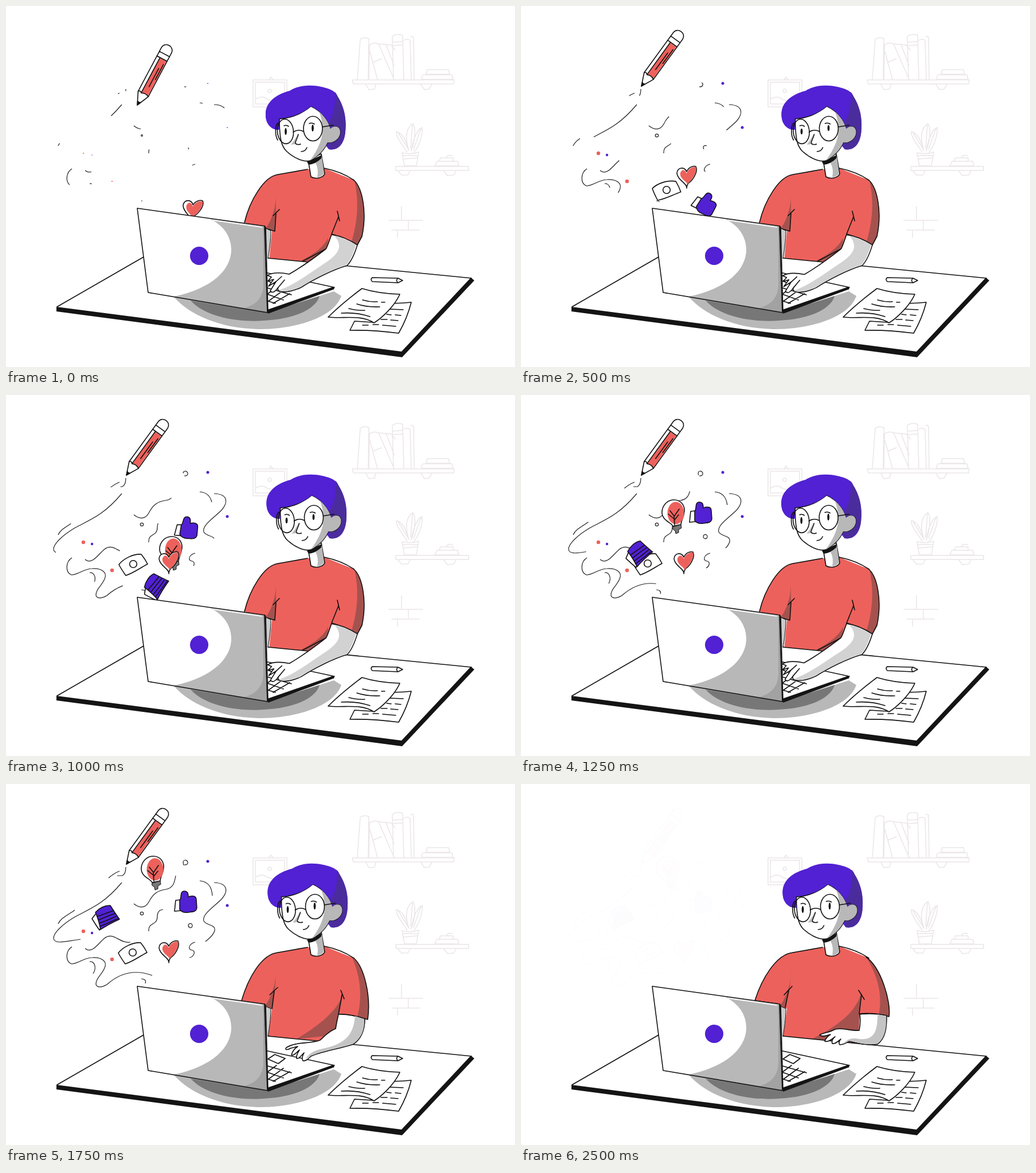
Recreate the animation shown at these times as an HTML page. Size 888x630 px, loop 2.75 s.

```html
<!DOCTYPE html>
<html lang="en">
<head>
<meta charset="utf-8">
<title>Ideas at the desk</title>
<style>
html, body { margin: 0; width: 100%; height: 100%; overflow: hidden; background: #fff; }
svg { display: block; width: 888px; height: 630px; }
path, ellipse, circle { stroke-linecap: round; stroke-linejoin: round; }
.ink { fill: none; stroke: #111; stroke-width: 1.6; }
.thin { fill: none; stroke: #222; stroke-width: 1.2; }
.thin path { stroke-linecap: butt; }
.wall { fill: none; stroke: #ebe6e8; stroke-width: 1.5; }
.paper { fill: #fff; stroke: #111; stroke-width: 1.6; }
.red { fill: #ed615c; }
.maroon { fill: #a5524e; }
.violet { fill: #5121d3; }
.plum { fill: #4a2c9c; }
.grey { fill: #b8b8b8; }
.dark { fill: #777; }
.black { fill: #141414; }
</style>
</head>
<body>
<svg viewBox="0 0 888 630">
  <g class="wall">
    <path d="M604,129H782L781,136H606ZM628,137L633,146L643,145L645,137M724,137L730,146L738,145L743,137"/>
    <path d="M613,128L618,58Q625,53 633,57L632,128M633,128L634,68Q642,62 650,66L677,128M650,66L672,68L679,77M640,98L655,92M648,128L635,80M663,67L677,104M676,128L674,53Q682,47 692,51L694,128M675,63L692,62M676,69L692,68M694,60Q700,56 705,60L707,128M706,54Q709,51 711,55L712,128"/>
    <path d="M735,111H772L774,119H733ZM728,120H778L780,128H726Q723,124 728,120"/>
    <path d="M431,129H490V176H431ZM435,133H486V171H435ZM459,129L462,124L466,129M435,163Q447,155 456,163Q470,168 485,162"/>
    <circle cx="460" cy="148" r="3"/>
    <path d="M680,280H807V287H680ZM684,288L690,295L701,295L705,288M764,288L770,296L781,295L785,288"/>
    <path d="M691,256Q705,260 720,255L716,279H695ZM692,261H719M694,267L717,265M700,255C690,240 680,228 681,219C692,222 697,233 703,252C694,225 700,212 710,205C716,216 714,232 707,253C710,232 718,215 726,212C727,228 720,245 712,255M709,208L706,248M684,221L702,250M724,214L711,250"/>
    <path d="M752,271H788L790,279H748ZM758,265H780V271H756ZM768,265Q770,259 779,261"/>
    <path d="M690,350V373M668,374H727M702,374V391M673,391H721M683,392V404"/>
  </g>

  <g id="ideas">
    <g id="lines" class="thin"></g>
    <g id="dots"></g>
    <g id="pencil">
      <path class="paper" d="M0,0L-10,-22V-92H10V-22Z"/>
      <path class="red" d="M-4,-22V-91H9V-22Q3,-26 -4,-22"/>
      <path class="ink" d="M-10,-22Q-7,-26 -4,-22Q3,-26 10,-22M-4,-22V-91M3,-38V-74M7,-54V-84"/>
      <path class="paper" d="M-10,-92H10V-101H-10ZM-10,-101V-109C-9,-121 9,-121 10,-109V-101Z"/>
      <path class="black" d="M0,0L-3.2,-7Q0,-5 3.2,-7Z" stroke="#111"/>
    </g>
    <g id="bulb">
      <path class="paper" d="M-1,23C-3,17 -20,13 -20,-1C-20,-13 -11,-23 1,-23C13,-23 20,-13 19,-3C18,9 13,13 13,20Z"/>
      <ellipse class="red" cx="4" cy="0" rx="14.5" ry="19.5"/>
      <path class="dark" stroke="#111" d="M-1,24L13,20L14,26L9,29V34L4,36L3,31L-1,28Z"/>
      <path class="ink" d="M2,21L1,5L-6,-4M1,6L10,-7M1,13L9,3M1,10L-9,2"/>
    </g>
    <g id="camera">
      <path class="paper" d="M-25,1C-18,-9 0,-18 14,-17C18,-12 22,-6 25,0C10,8 0,16 -13,20C-18,13 -22,7 -25,1Z"/>
      <circle class="ink" r="6.3"/>
    </g>
    <g id="card">
      <path class="paper" d="M-24,1L-17,-8L-3,8L-11,21Q-18,11 -24,1Z"/>
      <path class="violet" stroke="#111" stroke-width="1.5" d="M-18,-10C-12,-17 -1,-23 8,-22C13,-14 18,-6 24,2C13,7 0,14 -9,20Q-12,4 -18,-10Z"/>
      <path class="ink" d="M-14,-3Q0,-8 13,-13M-12,3Q2,-3 16,-8M-11,9Q3,4 18,-3M-9,14Q6,8 21,1"/>
    </g>
    <g id="thumb">
      <path class="paper" d="M-18,-3L-9,-4V15L-20,16Z"/>
      <path class="violet" stroke="#111" stroke-width="1.5" d="M-11,-3C-7,-8 -11,-18 -4,-19C4,-20 4,-13 4,-9C10,-11 18,-12 18,-4L19,10C18,18 10,17 4,18C-3,19 -8,17 -11,13Z"/>
    </g>
    <g id="heart">
      <path class="paper" d="M-1,20C1,12 -17,6 -18,-6C-17,-17 -5,-18 -1,-9C2,-16 10,-20 15,-18C20,-8 8,8 2,11C0,14 -1,16 -1,20Z"/>
      <path class="red" d="M0,13C0,8 -14,4 -12,-7C-9,-14 -4,-13 -1,-6C2,-14 9,-18 15,-17C18,-7 7,7 0,13Z"/>
    </g>
  </g>

  <g class="body">
    <path class="red" d="M475,294L526,285L555,283L607,304C622,318 630,360 621,402L613,417C600,411 585,402 568,398L590,455L459,445L464,392L416,378C425,340 450,297 475,294Z"/>
    <path class="maroon" d="M608,305C623,322 630,360 621,402L613,417L603,411C612,380 617,345 608,305ZM471,330C471,360 458,382 452,390L469,393L471,362ZM562,405C552,424 530,437 514,445L540,446L561,424Z"/>
    <path class="ink" d="M607,304C622,318 630,360 621,402L613,417C600,411 585,402 568,398L580,368M578,358L582,375M416,378C425,340 450,297 475,294M477,355L466,366M471,362L469,393L452,388M516,446L560,423"/>
  </g>
  <g class="body">
    <path class="red" d="M475,294L526,285L555,283L607,304C625,320 637,370 631,411L580,402L577,455L457,445L464,392L411,378C422,340 445,297 475,294Z"/>
    <path class="maroon" d="M604,303C627,322 637,370 631,411L613,406C621,375 620,340 604,303ZM472,325C470,360 456,382 450,390L465,393L469,362ZM589,364C578,400 535,428 507,445L575,438L580,402Z"/>
    <path class="ink" d="M607,304C625,320 637,370 631,411Q605,402 580,402L586,368M584,360L590,375M411,378C422,340 445,297 475,294M474,355L460,368M468,361L464,392"/>
  </g>
  <g class="body">
    <path class="red" d="M475,294L526,285L555,283L602,302C628,320 646,380 642,406L590,401L588,460L457,445L464,392L408,378C420,340 445,297 475,294Z"/>
    <path class="maroon" d="M602,302C628,320 646,380 642,406L624,403C632,365 620,330 602,302ZM472,325C470,360 456,382 450,390L461,390L468,362ZM593,366C582,405 540,428 508,445L588,450L591,401Z"/>
    <path class="ink" d="M602,302C628,320 646,380 642,406Q615,398 590,401L594,367M589,360L599,376M408,378C420,340 445,297 475,294M473,353L459,368M467,360L461,390M408,378L450,384"/>
  </g>
  <path fill="#ccc" stroke="#111" d="M453,388L462,392C462,410 459,428 457,442H452Z"/>
  <path class="ink" d="M475,294L526,285M555,283Q585,289 607,304"/>

  <path class="paper" d="M527,268L532,298C540,303 553,300 556,293L550,258Z"/>
  <path class="grey" d="M540,274L551,262L555,292Q551,298 543,299Q546,285 540,274Z"/>
  <path class="black" d="M525,272L551,260L550,266Q540,276 528,277Z"/>

  <g id="head">
    <path class="violet" d="M453,190C452,170 468,155 495,148C510,138 532,137 550,141C570,145 577,152 578,157C592,178 594,200 592,220C590,240 580,253 563,250L540,220L478,216C462,217 453,205 453,190Z"/>
    <path class="plum" d="M574,150C592,178 594,200 592,220C590,240 580,253 563,250L562,238L580,225L574,208L566,212Q580,180 574,150Z"/>
    <path class="paper" d="M477,197C477,230 480,245 490,254C502,265 519,273 530,270C545,262 556,250 561,238C572,240 583,231 583,220C583,209 571,208 566,214C563,200 550,183 532,175C515,189 495,196 477,197Z"/>
    <path class="grey" d="M546,184Q560,196 566,214C572,208 583,209 583,220C583,231 572,240 561,238C553,255 542,263 530,270Q549,245 552,222Q553,200 546,184ZM509,223L504,241L497,242Q504,234 509,223Z"/>
    <path class="violet" d="M453,190C453,170 470,154 500,147L548,150L532,175C515,189 495,196 472,195L478,216C462,217 453,205 453,190ZM532,175C550,183 563,200 566,214L575,206L570,160L540,150Z"/>
    <path class="plum" d="M574,150Q580,165 577,206L566,214L562,204Q576,185 574,150Z"/>
    <g class="ink">
      <ellipse cx="487.5" cy="219" rx="14" ry="21.5" transform="rotate(-5 487 219)"/>
      <ellipse cx="535.5" cy="214" rx="16.5" ry="21.5"/>
      <path d="M501,220Q510,214 519,219M552,211L571,208M475,204C469,207 469,226 474,234M485,209Q489,207 493,210M529,205Q534,203 538,206M510,224C508,232 504,237 505,240Q509,243 514,241M515,254Q522,254 525,247"/>
    </g>
    <ellipse class="eye" cx="488" cy="219" rx="1.8"/>
    <ellipse class="eye" cx="535" cy="213" rx="1.8"/>
  </g>

  <path fill="#fff" d="M89,526L240,438L457,440L812,475L690,606Z"/>
  <path class="ink" d="M89,525L240,438M457,440L812,475"/>
  <path class="black" d="M88,525L690,603L811,474L817,479L691,613L88,533Z"/>
  <path class="grey" d="M293,508L456,535L572,498L585,506C572,545 500,565 440,564C370,562 320,538 293,508Z"/>
  <path class="dark" d="M322,514C350,545 410,552 450,549C510,546 542,526 547,506L456,535Z"/>

  <path class="paper" d="M662,518Q685,520 707,517Q700,545 685,571Q640,565 600,566L608,550L640,552Z"/>
  <path class="ink" d="M668,529L693,530M664,538L672,539M679,539L689,540M654,547L665,547M671,548L684,549M640,556L650,556M657,557L680,559M622,557L632,557"/>
  <path class="paper" d="M621,493Q650,502 687,503C678,524 655,545 642,553C620,538 590,546 562,543C580,525 605,505 621,493Z"/>
  <path class="ink" d="M622,513Q635,517 648,516M655,517L661,517M612,520Q630,526 652,525M598,528Q615,532 626,531M585,536Q610,534 635,542"/>
  <path class="paper" d="M639,474L684,475L692,479L684,483L639,481Q635,477 639,474ZM684,475Q679,479 684,483"/>

  <path class="paper" d="M452,465L573,491L456,533Z"/>
  <path class="black" d="M456,530L571,490L573,494L457,537Z"/>
  <path class="ink" d="M457,480L469,472L487,479L475,488ZM456,492L498,504M456,503L484,513M457,515L470,519M484,496L458,515M472,491L457,502M495,502L466,519"/>

  <g class="arm" id="typing">
    <path stroke="#a5524e" fill="none" stroke-width="3" d="M594,446V453"/>
    <path class="paper" d="M568,399C563,412 561,420 558,424C540,438 515,456 494,468C480,465 465,465 456,470L463,473L457,480L467,477L458,489L471,481L461,497C465,503 471,497 475,491C470,501 492,502 515,491C535,478 570,460 595,453C603,445 609,430 613,417Q590,402 568,399Z"/>
    <path fill="#d2d2d2" d="M573,401Q590,404 611,417C606,430 602,443 594,452C570,459 535,477 515,490C496,499 478,499 476,496C500,488 525,470 550,453C577,436 591,422 573,401Z"/>
    <path class="ink" d="M481,472L471,481M486,478L475,491"/>
  </g>
  <g class="arm">
    <path class="paper" d="M580,402Q577,415 575,427C562,432 555,441 548,447C530,454 507,449 489,460C486,464 490,465 497,461L509,458Q500,464 498,473C502,475 506,469 512,464Q506,473 507,479C512,480 515,473 520,469Q515,478 518,483C523,484 527,480 532,475C555,465 588,461 606,454C620,445 626,428 626,410Q600,401 580,402Z"/>
    <path fill="#c4c4c4" d="M609,405L625,410C626,428 620,444 606,453C588,460 555,464 532,474L522,481Q530,466 552,462C590,454 606,440 609,405Z"/>
  </g>
  <g class="arm">
    <path class="paper" d="M591,402Q593,415 590,430C575,431 562,425 548,428C538,434 527,434 521,438C524,442 533,439 540,437Q532,442 530,449C536,451 542,445 548,441Q541,447 543,453C549,454 553,449 558,445Q553,451 556,455C564,455 568,451 573,449C590,453 605,457 622,454C636,444 638,425 638,404Q615,399 591,402Z"/>
    <path fill="#c4c4c4" d="M622,402L637,405C638,425 635,444 622,453C605,456 590,452 573,448L562,453Q572,441 590,445C617,448 622,430 622,402Z"/>
  </g>

  <path fill="#fff" d="M229,353L451,384L456,535L248,500Z"/>
  <path class="grey" d="M357,372L451,385L456,535L293,507C360,493 393,460 393,425Q392,390 357,372Z"/>
  <path fill="#a2a2a2" d="M449,386L452,385L456,535L415,527Q446,520 449,490Z"/>
  <path class="ink" d="M229,353L451,384L456,535L248,500Z"/>
  <path stroke="#fff" stroke-width="1.5" d="M362,374L446,386"/>
  <path class="ink" d="M451,384L453,386L457,533"/>
  <circle class="violet" cx="337" cy="436" r="16"/>
</svg>
<script>
const STEP = 250, STEPS = 11;
const $ = id => document.getElementById(id);
const all = sel => [...document.querySelectorAll(sel)];
const at = (list, n) => list[Math.min(n, list.length - 1)];

function add(parent, tag, attrs) {
  const el = document.createElementNS('http://www.w3.org/2000/svg', tag);
  for (const k in attrs) el.setAttribute(k, attrs[k]);
  return parent.appendChild(el);
}

const swirls = [
  'M202,172C170,210 148,217 120,232C98,245 83,260 83,269C84,281 106,274 130,271',
  'M91,244C96,233 108,229 120,220',
  'M115,284C104,291 103,309 114,314C126,314 136,303 150,303C168,302 177,310 172,321C167,333 156,340 157,350C160,357 169,354 176,350C196,332 222,322 255,334',
  'M138,287C150,297 160,279 172,269C188,257 198,279 217,276',
  'M146,310C154,309 159,320 152,331',
  'M198,152Q188,156 179,164',
  'M209,145Q209,157 203,160L194,160',
  'M223,209C233,217 243,217 249,206C257,190 266,186 278,184C292,182 294,172 296,160',
  'M249,257C248,240 264,248 264,231Q264,220 274,219',
  'M319,250C315,243 325,241 325,247C325,252 319,252 319,248',
  'M311,141C320,142 318,132 312,133C307,134 310,140 310,142',
  'M338,169C350,170 359,176 360,195',
  'M363,172C386,173 389,186 376,201C362,215 342,227 345,239C350,248 366,244 364,256C361,266 353,270 348,275',
  'M330,276C318,279 317,290 325,290C332,292 327,302 320,303',
  'M236,340C241,340 245,342 243,348'
].map(d => add($('lines'), 'path', { d, pathLength: 1 }));

const RED = '#ed615c', VIOLET = '#5121d3';
const dots = [
  [352, 135, 2.5, VIOLET], [386, 212, 2.5, VIOLET], [150, 260, 2.2, VIOLET],
  [135, 257, 3.2, RED], [185, 306, 3.2, RED]
].map(([cx, cy, r, fill]) => ({ r, el: add($('dots'), 'circle', { cx, cy, fill }) }));
const ring = add($('dots'), 'circle', { cx: 237, cy: 226, class: 'thin' });

// Each stop is x, y, angle; the last one holds.
const hidden = [310, 425, 0];
const tracks = {
  pencil: [[229, 173, 28], [210, 140, 36]],
  heart: [[326, 356, 8], [305, 315, 3], [290, 298, 0], [285, 292, 0]],
  camera: [hidden, [300, 375, 20], [254, 321, 8], [226, 297, 0], [222, 295, 0], [221, 294, 0]],
  thumb: [hidden, hidden, [322, 345, 32], [321, 298, 25], [316, 232, 9], [314, 206, 0]],
  bulb: [hidden, hidden, hidden, [305, 382, 0], [288, 270, 0], [266, 206, 0], [258, 160, 0], [256, 149, 0]],
  card: [hidden, hidden, hidden, hidden, [262, 335, -30], [206, 278, -15], [181, 243, -4], [174, 234, 0]]
};
const drawn = [.13, .28, .46, .62, .79, .92, .98, 1];
const dotSize = [.35, .75, 1];
const fade = [1, 1, 1, 1, 1, 1, 1, 1, .9, .45, .012];
const lean = [0, 1, 1.5, 2, 1.5, 1.2, 2.5, 3.5];
const eye = [6, 6, 5, 3.2, 5, 6];
const tap = [0, .5, -.3, .4, -.3, .3, 1.5];

function render(n) {
  const p = at(drawn, n), s = at(dotSize, n);
  for (const el of swirls) el.setAttribute('stroke-dasharray', p < 1 ? `${p} 2` : 'none');
  for (const { el, r } of dots) el.setAttribute('r', r * s);
  ring.setAttribute('r', Math.max(1.3, 2.7 * s));
  for (const id in tracks) {
    const [x, y, a] = at(tracks[id], n);
    $(id).setAttribute('transform', `translate(${x} ${y}) rotate(${a})`);
  }
  $('ideas').setAttribute('opacity', fade[n]);
  $('head').setAttribute('transform', `translate(${at(lean, n)} 0)`);
  all('.eye').forEach(el => el.setAttribute('ry', at(eye, n)));
  $('typing').setAttribute('transform', `rotate(${at(tap, n)} 592 415)`);
  const pose = n < 7 ? 0 : n < 8 ? 1 : 2;
  for (const sel of ['.body', '.arm'])
    all(sel).forEach((el, i) => { el.style.display = i === pose ? '' : 'none'; });
}

let shown = -1;
function tick(now) {
  const n = Math.floor(now / STEP) % STEPS;
  if (n !== shown) render(shown = n);
  requestAnimationFrame(tick);
}
render(0);
requestAnimationFrame(tick);
</script>
</body>
</html>
```
